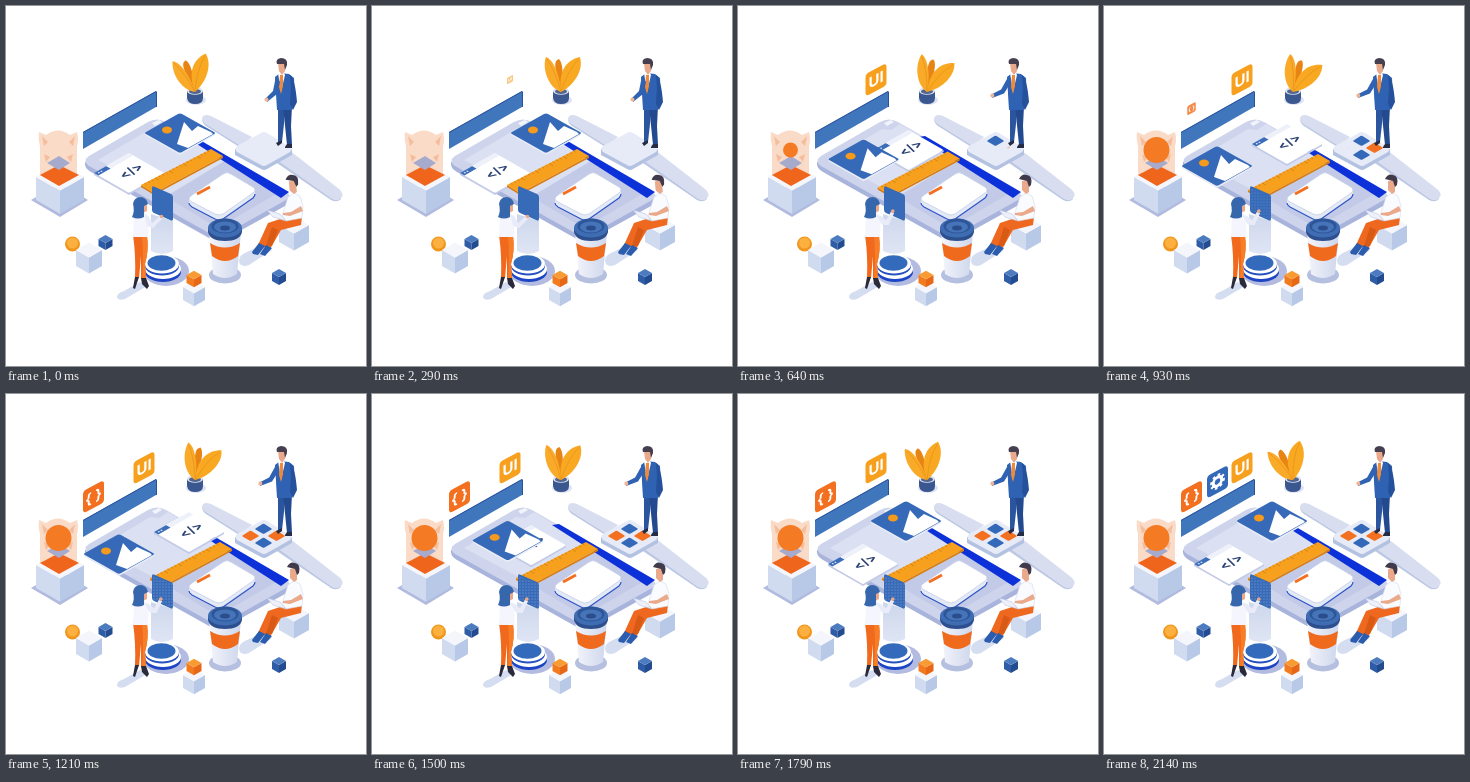
Write an HTML page that moves like this. It is 360x360 px and loops after 2430 ms.

```html
<!DOCTYPE html>
<html lang="en">
<head>
<meta charset="utf-8">
<title>Design studio</title>
<style>
html, body { margin: 0; width: 100%; height: 100%; overflow: hidden; background: #fff; }
svg { display: block; width: 100vw; height: 100vh; }
text { font-family: Inter, Roboto, sans-serif; font-weight: 700; text-anchor: middle; }
</style>
</head>
<body>
<svg viewBox="0 0 360 360">
  <defs>
    <pattern id="dots" width="3" height="3" patternUnits="userSpaceOnUse">
      <circle cx="1" cy="1" r=".55" fill="#a9c1ea"/>
    </pattern>
    <linearGradient id="beam" x2="0" y2="1">
      <stop offset="0" stop-color="#cdd7ec"/><stop offset="1" stop-color="#dfe5f4"/>
    </linearGradient>
    <linearGradient id="cupSide">
      <stop offset="0" stop-color="#f4f5fb"/><stop offset="1" stop-color="#cdd6ec"/>
    </linearGradient>
  </defs>

  <!-- banner -->
  <path d="M77 126L150 85V101L77 143Z" fill="#4076bc"/>
  <path d="M77 126L150 85L151 86V101L150 101V86L77 127Z" fill="#2a519c"/>
  <g id="icons"></g>

  <!-- phone -->
  <path d="M79 156Q78 162 85 166L203 232Q212 237 221 232L279 200Q285 197 284 190Z" fill="#a9b4dc"/>
  <path d="M83 150L142 116Q151 111 160 116L280 185Q287 190 280 194L221 227Q212 232 203 227L83 160Q76 155 83 150Z" fill="#cdd4ec"/>
  <path d="M92 154L144 123L153 124L162 118L177 127L191 135L222 153L160 190Z" fill="#dbe0f2"/>
  <path d="M222 153L272 187L212 222L160 191Z" fill="#c2cae8"/>
  <path d="M146 117L153 114L156 116L149 120Z" fill="#f2f4fb"/>
  <path d="M180 131L187 130L283 186L275 192Z" fill="#0c31d8"/>

  <g id="codeCard">
    <path d="M-35 0L0 20L35 0V2L0 22L-35 2Z" fill="#c3cae6"/>
    <g transform="matrix(.875 -.5 .875 .5 0 0)">
      <rect x="-20" y="-20" width="40" height="40" rx="1.5" fill="#fff"/>
      <path d="M-20-20H-6V-15H-20Z" fill="#3c6dba"/>
      <path d="M-6-20H20V-15H-6Z" fill="#eef1fa"/>
      <circle cx="-17" cy="-17.5" r=".8" fill="#fff"/>
      <circle cx="-14" cy="-17.5" r=".8" fill="#fff"/>
      <text x="3" y="3.5" font-size="13" fill="#2b4173">&lt;/&gt;</text>
    </g>
  </g>
  <g id="imageCard">
    <path d="M-35 0L0 20L35 0V2L0 22L-35 2Z" fill="#e9ecf7"/>
    <path d="M-34-1L-2-19Q0-20 2-19L34-1Q36 0 34 1L2 19Q0 20-2 19L-34 1Q-36 0-34-1Z" fill="#366ab8"/>
    <path d="M-3 11L4-11L12-2L18-7L31-1L33 1L8 15Z" fill="#fff"/>
    <ellipse cx="-13" cy="-3" rx="5" ry="3.4" fill="#f59a1c"/>
  </g>

  <g id="ruler">
    <path d="M144 184L157 192L226 155V157L157 194L144 186Z" fill="#d97d10"/>
    <path d="M144 184L214 148L226 155L157 192Z" fill="#f7a01e"/>
    <g id="ticks" stroke="#c77a14" stroke-width=".7"></g>
  </g>

  <!-- white card -->
  <path d="M183 193V197Q183 199 186 201L209 213Q213 215 217 213L247 192Q249 190 249 185Z" fill="#e4e9f6"/>
  <path d="M183 197Q183 199 186 201L209 213Q213 215 217 213L247 192Q249 190 249 188" fill="none" stroke="#2f55c8" stroke-width="1.2"/>
  <path d="M186 189L217 168Q221 165 225 168L247 181Q251 184 247 187L217 208Q213 210 209 208L186 196Q180 193 186 189Z" fill="#fff" stroke="#c3cde9" stroke-width=".8"/>
  <path d="M191 188L204 181" stroke="#f27022" stroke-width="3"/>

  <!-- watch -->
  <path d="M196 112Q198 107 205 110L246 131L235 140L200 118Q196 115 196 112Z" fill="#d8def0"/>
  <path d="M196 113Q197 116 200 118L235 140V142L200 120Q196 117 196 113Z" fill="#bcc8e4"/>
  <path d="M270 153L283 144L333 183Q339 188 335 192Q331 196 325 192Z" fill="#d8def0"/>
  <path d="M270 153L325 192Q331 196 335 192V193Q331 197 325 194L268 155Z" fill="#bcc8e4"/>
  <path d="M229 143V149L255 163Q258 165 261 163L286 149V143Z" fill="#b4c2e2"/>
  <path d="M231 140L255 127Q258 125 261 127L284 141Q287 143 284 146L261 159Q258 161 255 159L231 146Q228 143 231 140Z" fill="#e7ebf7"/>
  <g id="tiles"></g>

  <!-- plant -->
  <ellipse cx="190" cy="94" rx="10" ry="5" fill="#dfe3f2"/>
  <path d="M181 85V92Q182 98 189 98Q197 98 197 92V85Z" fill="#3a588f"/>
  <ellipse cx="189" cy="85" rx="8" ry="3.8" fill="#dce2f0"/>
  <ellipse cx="189" cy="85.5" rx="6" ry="2.5" fill="#51658f"/>
  <g id="plant">
    <path d="M189 86C180 54 184 55 187 53C191 56 192 68 189 86Z" fill="#e88413"/>
    <path d="M189 86C177 82 170 64 174 51C181 53 188 68 189 86Z" fill="#f9aa28"/>
    <path d="M189 86C186 66 194 54 208 51C212 62 204 78 189 86Z" fill="#f9a822"/>
    <path d="M189 86Q184 66 175 53M189 86Q196 64 207 53" fill="none" stroke="#e8921a" stroke-width=".7"/>
  </g>

  <!-- standing man -->
  <path d="M272 100H279L278 118L276 136H272Z" fill="#2b559f"/>
  <path d="M277 100H286L285 120L286 139H281Z" fill="#234a8f"/>
  <path d="M270 137L276 134V137L272 140ZM279 141L281 138H286V142H279Z" fill="#252c45"/>
  <path d="M269 71L274 67L283 68L288 72L289 96L286 104H271Z" fill="#2f62b3"/>
  <path d="M272 67L277 65L279 69L275 86Z" fill="#fff"/>
  <path d="M274 69H277V80L275 88L273 81Z" fill="#ef8a3a"/>
  <path d="M284 69Q289 72 291 96L287 104L284 98L285 82Z" fill="#24509c"/>
  <path d="M272 57H279V65L276 69L273 65Z" fill="#e9a98a"/>
  <path d="M271 58Q269 53 275 52Q282 52 281 59L279 64L278 58Z" fill="#463f50"/>
  <g id="manArm">
    <path d="M270 70L274 76L271 88L261 96L260 92L267 85Z" fill="#2f62b3"/>
    <circle cx="260.5" cy="93.5" r="2" fill="#efb493"/>
  </g>

  <!-- hologram -->
  <path d="M25 194L54 177L82 194L54 211Z" fill="#b1bbdf"/>
  <g id="holoCube"></g>
  <path d="M34 169V140Q32 132 33 126L40 129Q52 120 64 129L71 126Q73 133 71 140V169L53 179Z" fill="#f7c5a6" opacity=".62"/>
  <path d="M36 130L42 136L38 140ZM69 130L63 136L67 140ZM38 148L44 151L40 156ZM67 148L61 151L65 156Z" fill="#f0a679" opacity=".55"/>
  <path d="M34 169L53 159L73 169L53 180Z" fill="#f0651c"/>
  <path d="M41 157L53 150L64 157L53 164Z" fill="#a6abcd"/>
  <circle id="orb" cx="52.5" cy="144" r="13" fill="#f47a24"/>

  <!-- sitting man -->
  <path d="M233 255Q233 249 241 246L258 238L266 244L243 259Q234 262 233 255Z" fill="#d5ddf0"/>
  <g id="seat"></g>
  <path d="M262 217L280 211L296 211L295 219L275 224L264 243L252 239Z" fill="#ee691f"/>
  <path d="M266 221L272 224L266 240L260 240Z" fill="#d95a14"/>
  <path d="M246 246L253 237L259 240L252 249L247 248ZM254 248L260 239L266 242L259 250Z" fill="#2b5cae"/>
  <path d="M282 191L288 187L294 190L297 200L296 212L280 215L276 210Z" fill="#fafbff" stroke="#d3dbee" stroke-width=".6"/>
  <path d="M295 200L297 205L284 210L277 209V207L285 206Z" fill="#e9a98a"/>
  <path d="M261 204L274 208L280 215L267 211Z" fill="#eef1fa" stroke="#bcc8e4" stroke-width=".6"/>
  <g id="sitHead">
    <path d="M284 175L291 174L291 186L288 188L284 184Z" fill="#e9a98a"/>
    <path d="M281 173Q284 167 289 169Q295 170 293 179L291 181L289 175Z" fill="#403a4a"/>
  </g>

  <!-- pedestal and beam -->
  <ellipse cx="160" cy="265" rx="23" ry="15" fill="#b3bce0"/>
  <ellipse cx="157" cy="266" rx="18" ry="10" fill="#1d45c4"/>
  <ellipse cx="157" cy="263" rx="18" ry="10" fill="#fff"/>
  <ellipse cx="156" cy="260" rx="17" ry="9.5" fill="#2450c0"/>
  <ellipse cx="156" cy="258" rx="17" ry="9.5" fill="#fff"/>
  <ellipse cx="155.5" cy="257" rx="14" ry="7.8" fill="#336abb"/>
  <path d="M145 208L167 215V245Q156 251 145 245Z" fill="url(#beam)"/>

  <!-- woman -->
  <path d="M111 291Q111 287 118 285L134 276L141 280L119 293Q112 295 111 291Z" fill="#d5ddf0"/>
  <path d="M127 229H141Q143 245 139 258L140 273H135L135 250L133 272H129Q130 250 127 229Z" fill="#f0691c"/>
  <path d="M136 230H141Q143 245 139 258L140 273H136Q138 250 136 230Z" fill="#f77d26"/>
  <path d="M129 271H133L131 277L129 283L127 282ZM135 272H140L143 280L141 283L136 278Z" fill="#2a2a3b"/>
  <path d="M128 208L138 206L143 211L142 231H127Z" fill="#f5f6fd"/>
  <path d="M146 182Q146 179 149 181L165 188Q167 189 167 191V213Q167 216 164 214L148 207Q146 206 146 204Z" fill="#376ab7"/>
  <path id="tabletDots" d="M146 182L167 190V214L146 205Z" fill="url(#dots)"/>
  <g id="womanArm">
    <path d="M138 208L143 211L146 217L154 210L156 213L147 222L141 220Z" fill="#e9ecf8"/>
    <circle cx="155.5" cy="210.5" r="1.8" fill="#e9a98a"/>
  </g>
  <path d="M137 196L141 197L141 205L137 207Z" fill="#e9a98a"/>
  <path d="M127 198Q128 191 135 191Q141 192 142 198L138 200L138 211Q132 214 126 211Q129 205 127 198Z" fill="#3667ad"/>

  <!-- cup -->
  <ellipse cx="219" cy="269" rx="16" ry="8.5" fill="#b5bfe0"/>
  <path d="M203 226L207 268Q219 276 231 268L235 226Z" fill="url(#cupSide)"/>
  <path d="M204 237Q219 246 234 237L232 250Q219 260 206 250Z" fill="#ef6a1d"/>
  <path d="M202 222V226Q204 235 219 235Q234 235 236 226V222Z" fill="#2d4f8e"/>
  <ellipse cx="219" cy="222" rx="17" ry="9.5" fill="#3f6db3"/>
  <ellipse cx="219" cy="220" rx="13.5" ry="7.5" fill="#2f5599"/>
  <ellipse cx="219" cy="221" rx="11" ry="5.5" fill="#4674b8"/>
  <ellipse cx="219" cy="222" rx="5" ry="2.5" fill="#2b4d8c"/>

  <circle cx="66.5" cy="238" r="7.5" fill="#f0961c"/>
  <circle cx="66.5" cy="237" r="5.5" fill="#fbb040"/>
  <g id="cubes"></g>
</svg>
<script>
const $ = id => document.getElementById(id);
const add = (id, markup) => $(id).insertAdjacentHTML("beforeend", markup);
const blue = "#3469b9", orange = "#f2701f", amber = "#f7a01e";

// Isometric block: x, y is the centre of the top face
function cube(x, y, w, h, [top, left, right]) {
  const d = w * 0.57;
  return `<path d="M${x - w} ${y}v${h}l${w} ${d}v${-h}z" fill="${left}"/>` +
    `<path d="M${x + w} ${y}v${h}l${-w} ${d}v${-h}z" fill="${right}"/>` +
    `<path d="M${x - w} ${y}l${w} ${-d}l${w} ${d}l${-w} ${d}z" fill="${top}"/>`;
}
const pale = ["#f4f6fc", "#d0dbf0", "#b8c9e7"];
const navy = ["#4d7bc0", "#2f5ca6", "#234b8f"];
const warm = ["#f99b33", "#f27a1f", "#e86716"];

add("holoCube", cube(54, 171, 24, 23, pale));
add("seat", cube(288, 219, 15, 17, pale));
add("cubes", cube(83, 244, 13, 16, pale) + cube(99.5, 233, 7, 7, navy) +
  cube(188, 281, 11, 13, pale) + cube(188, 269, 7.5, 8, warm) +
  cube(273, 267, 7, 8, navy));

for (let i = 1; i < 20; i++) {
  const x = 144 + i * 3.5, y = 184 - i * 1.8, n = i % 4 ? 2 : 4;
  add("ticks", `<path d="M${x} ${y}l${n} ${n * 0.58}"/>`);
}

// Things that pop in: place, start and duration
const pops = [];
function pop(parent, x, y, start, length, markup) {
  add(parent, `<g>${markup}</g>`);
  pops.push({ el: $(parent).lastElementChild, x, y, start, length });
}
const badge = (color, inner) => `<g transform="skewY(-28)">
  <rect x="-10.5" y="-11" width="21" height="22.5" rx="3.5" fill="${color}"/>${inner}</g>`;
const label = (s, size) =>
  `<text y="${size * 0.36}" font-size="${size}" font-weight="800" fill="#fff">${s}</text>`;
const gear = `<g fill="none" stroke="#fff"><circle r="4.3" stroke-width="3"/>
  <circle r="6.3" stroke-width="2.4" stroke-dasharray="2.47"/></g>`;
pop("icons", 138, 73.5, 165, 340, badge(amber, label("UI", 15)));
pop("icons", 87.5, 102.5, 780, 340, badge(orange, label("{ }", 14)));
pop("icons", 113.5, 87.5, 1800, 320, badge(blue, gear));

const tile = color => `<path d="M-8 0L-1-4.6Q0-5 1-4.6L8 0Q8.5 .5 8 1L1 5Q0 5.5-1 5L-8 1Q-8.5 .5-8 0Z" fill="${color}"/>`;
[[257.5, 134.5, blue], [270.5, 141.5, orange], [257.5, 148.5, blue], [244.5, 141.5, orange]]
  .forEach(([x, y, color], i) => pop("tiles", x, y, 440 + i * 150, 190, tile(color)));

const LOOP = 2430, STEP = 71.4, LAST = 30;
const clamp = v => Math.min(1, Math.max(0, v));
const smooth = v => v * v * (3 - 2 * v);
const phase = (t, a, b) => smooth(clamp((t - a) / (b - a)));
const mix = (a, b, k) => a + (b - a) * k;
const put = (id, value) => $(id).setAttribute("transform", value);
const move = (id, x, y) => put(id, `translate(${x} ${y})`);

function draw(t) {
  const out = phase(t, 310, 780), back = phase(t, 1270, 1790);
  const swap = out * (1 - back);
  const rest = t < 1000 ? [174, 127, 123, 167] : [168, 127, 125, 170];
  move("imageCard", mix(rest[0], 113, swap), mix(rest[1], 160, swap));
  move("codeCard", mix(rest[2], 183, swap), mix(rest[3], 138, swap));

  const slide = 1 - phase(t, 350, 920);
  move("ruler", -9 * slide, -5 * slide);

  const sway = Math.cos((t - 900) / LOOP * 2 * Math.PI);
  put("plant", `rotate(${19 * sway} 189 86)`);

  const lift = phase(t, 300, 640);
  put("manArm", `rotate(${18 * lift} 270 72)`);
  put("womanArm", `rotate(${-20 * lift} 140 210)`);
  put("sitHead", `rotate(${-6 * (1 - lift)} 288 187)`);
  $("tabletDots").setAttribute("opacity", 0.75 * phase(t, 700, 1150));
  $("orb").setAttribute("r", 13 * phase(t, 330, 900));

  for (const { el, x, y, start, length } of pops) {
    const k = phase(t, start, start + length);
    el.setAttribute("transform", `translate(${x} ${y}) scale(${k})`);
    el.setAttribute("opacity", Math.min(1, 2 * k));
  }
}

const begin = performance.now();
function tick() {
  const t = Math.max(0, performance.now() - begin) % LOOP;
  draw(Math.min(LAST, Math.floor((t + 6) / STEP)) * STEP);
  requestAnimationFrame(tick);
}
tick();
</script>
</body>
</html>
```
